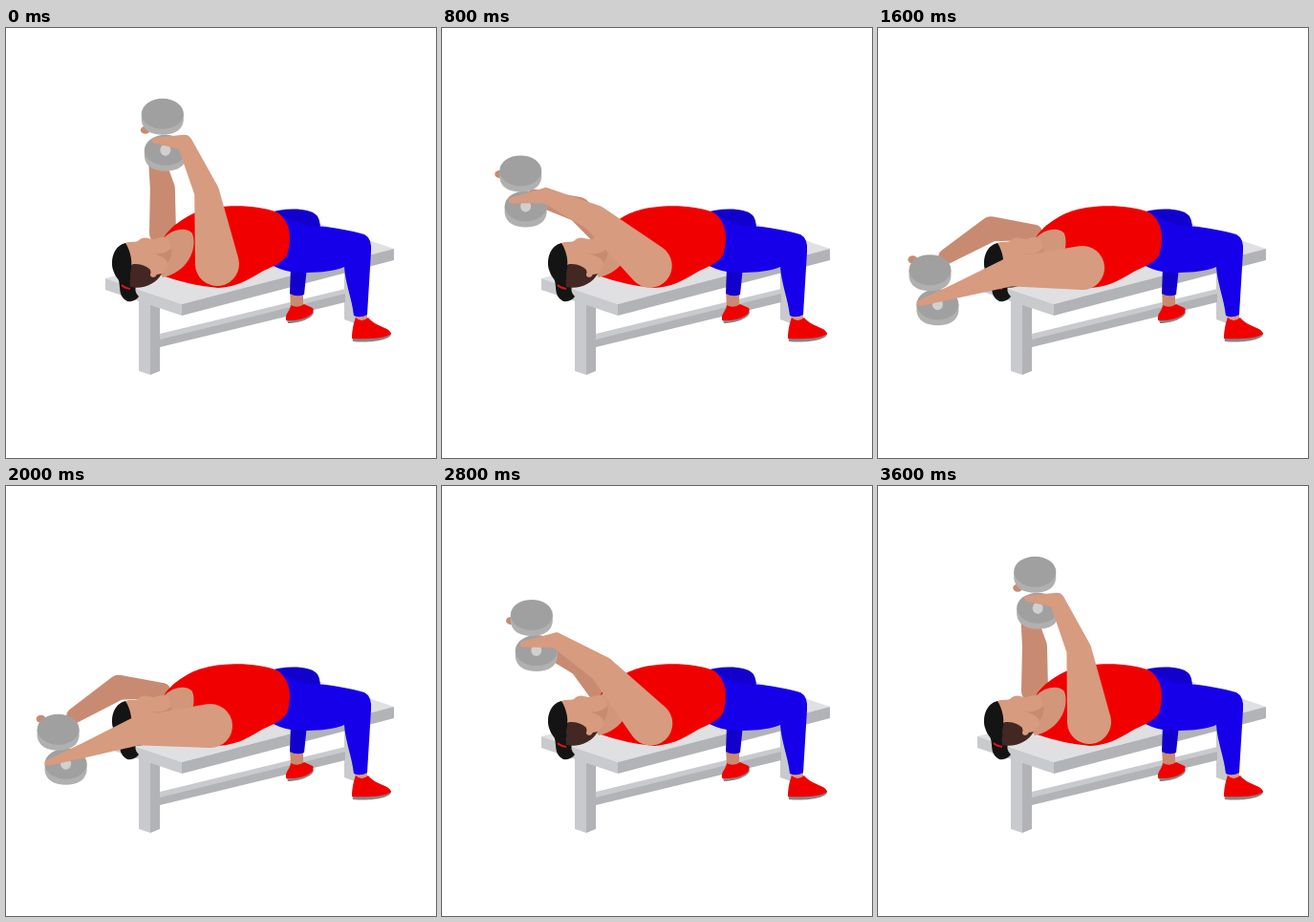
An HTML page that plays this animation: 450 px wide and 450 px high, repeating every 3.7 s.

```html
<!DOCTYPE html>
<html lang="en">
<head>
<meta charset="utf-8">
<title>Dumbbell pullover</title>
<style>
  html, body { margin: 0; width: 100%; height: 100%; overflow: hidden; background: #fff; }
  svg { display: block; width: 100%; height: 100%; }
  .skin { fill: #d79b7f; }
  .shade { fill: #c88b72; }
  .red { fill: #f10000; }
  .blue { fill: #1600ea; }
  .navy { fill: #1200cc; }
  .hair { fill: #141414; }
  .sole { fill: #858585; }
  .top { fill: #e0e0e2; }
  .side { fill: #c9cacd; }
  .front { fill: #b2b3b7; }
</style>
</head>
<body>
<svg viewBox="0 0 450 450">
  <defs>
    <g id="disc">
      <path fill="#b0b0b0" d="M-22 -3V4C-21 14 -12 19 0 19S21 14 22 4V-3Z"/>
      <ellipse cy="-3" rx="22" ry="16" fill="#a0a0a0"/>
    </g>
  </defs>

  <g id="bench">
    <path class="side" d="M354 245H365V309L354 305Z"/>
    <path class="front" d="M365 245H377V303L365 309Z"/>
    <path class="side" d="M161 320L355 273V279L161 327Z"/>
    <path class="front" d="M161 326L355 278V287L161 334Z"/>
    <path class="side" d="M139 280L151 285V363L139 359Z"/>
    <path class="front" d="M151 285L161 288V359L151 363Z"/>
    <path class="top" d="M104 262L326 204L406 231L184 289Z"/>
    <path class="side" d="M104 262L184 289V301L104 274Z"/>
    <path class="front" d="M184 289L406 231V243L184 301Z"/>
  </g>

  <g id="legs">
    <path class="shade" d="M297 275H311L311 292H298Z"/>
    <path class="sole" d="M293 302L322 297C322 304 306 309 295 309Z"/>
    <path class="red" d="M293 306C292 298 297 297 298 290Q305 294 312 289L321 293C325 300 310 307 293 306Z"/>
    <path class="navy" d="M298 250L297 278Q304 282 312 279L315 250Z"/>
    <path class="navy" d="M272 194C290 188 318 187 326 197Q331 206 327 214L280 225Z"/>
    <path class="skin" d="M365 296H378V309L368 311Z"/>
    <path class="sole" d="M362 322L403 319C405 326 383 330 363 328Z"/>
    <path class="red" d="M362 325C362 316 364 308 366 303Q372 309 379 303C387 313 402 313 403 320C398 325 376 326 362 325Z"/>
    <path class="blue" d="M280 194C291 193 299 206 321 207C342 208 361 212 375 216Q383 220 382 234L378 300Q371 304 364 301C362 283 355 267 354 250C340 256 315 257 298 255Q286 253 274 246Z"/>
  </g>

  <path id="far" class="shade"/>

  <path class="red" d="M166 218C172 208 190 195 205 191C228 184 264 185 284 193C299 203 299 222 294 238C288 247 277 250 266 256C250 266 238 271 222 272Q195 270 163 259Z"/>
  <path fill="#d2967b" d="M166 219C175 210 189 208 195 215C201 232 189 256 164 261L150 240Z"/>

  <g id="head">
    <path class="hair" d="M117 262C121 270 116 280 127 286Q135 287 139 281Q133 276 137 266Z"/>
    <path fill="none" stroke="#d8161c" stroke-width="2" d="M121 269Q124 272 130 273"/>
    <path class="skin" d="M122 227C128 222 134 225 138 223C145 216 150 222 156 221Q165 217 170 221C176 233 172 250 162 258L140 265Z"/>
    <path class="shade" d="M153 236Q166 238 173 230Q175 238 169 247Q169 240 153 236Z"/>
    <path fill="#422722" d="M128 249C136 244 148 249 151 253Q151 260 163 257C157 268 143 274 130 271Z"/>
    <path class="hair" d="M125 225C113 228 109 242 112 253Q116 267 129 268Q131 262 130 256C133 247 131 234 125 225Z"/>
    <path class="skin" d="M150 250Q157 246 158 253Q159 260 154 261Q149 260 152 255Z"/>
  </g>

  <ellipse id="finger" class="shade" rx="5" ry="4"/>
  <g id="low">
    <use href="#disc"/>
    <ellipse cy="-3" rx="5.5" ry="6" fill="#d0d0d0"/>
  </g>
  <path id="near" class="skin"/>
  <use id="high" href="#disc"/>
</svg>

<script>
const { sin, cos, PI, hypot, atan2, acos } = Math;
const LOOP = 3700, STEP = 100;
const el = id => document.getElementById(id);
const rad = deg => deg * PI / 180;

const ease = (t, from, to) => {
  const x = Math.min(1, Math.max(0, (t - from) / (to - from)));
  return (1 - cos(PI * x)) / 2;
};

// joints are [x, y, radius]; angles turn from upright towards the head
const reach = ([x, y], length, deg, r) =>
  [x - length * sin(rad(deg)), y - length * cos(rad(deg)), r];

// two circles wrapped by their outer tangents
function taper([ax, ay, ar], [bx, by, br]) {
  const dir = atan2(by - ay, bx - ax);
  const lean = acos((ar - br) / hypot(bx - ax, by - ay));
  const on = (x, y, r, a) => `${x + r * cos(a)} ${y + r * sin(a)}`;
  return `M${on(ax, ay, ar, dir - lean)}L${on(bx, by, br, dir - lean)}`
    + `A${br} ${br} 0 ${br > ar ? 1 : 0} 1 ${on(bx, by, br, dir + lean)}`
    + `L${on(ax, ay, ar, dir + lean)}`
    + `A${ar} ${ar} 0 ${ar > br ? 1 : 0} 1 ${on(ax, ay, ar, dir - lean)}Z`;
}

const limb = (id, ...joints) =>
  el(id).setAttribute("d", joints.slice(1).map((j, i) => taper(joints[i], j)).join(""));

const move = (id, [x, y]) => el(id).setAttribute("transform", `translate(${x} ${y})`);

function draw(time) {
  const t = Math.floor(time % LOOP / STEP) * STEP;
  const f = ease(t, -50, 1700) - ease(t, 1980, 3420);
  const angle = 8 + 86 * f;

  const shoulder = [221 - 7 * f, 247 + 4 * f, 23];
  const elbow = reach(shoulder, 76, angle, 13 + 2 * f);
  const wrist = reach(elbow, 57, angle + 16, 8);
  const low = [wrist[0] - 20 - 2 * f, wrist[1] + 11 + 7 * f];
  const high = [low[0] - 3 - 5 * f, low[1] - 38 + 2 * f];
  const tip = [low[0] - 11 - 8 * f, low[1] - 13 + 9 * f, 3];
  limb("near", shoulder, elbow, wrist, tip);

  const farShoulder = [164, 214, 14 - 6 * f];
  const farElbow = reach(farShoulder, 46 - 14 * sin(PI * f), angle - 8, 13);
  const farHand = [high[0] - 7 + 26 * sin(2 * f), high[1] + 42 * cos(2 * f), 8];
  limb("far", farShoulder, farElbow, farHand);

  move("low", low);
  move("high", high);
  move("finger", [high[0] - 18 - 4 * sin(PI * f), high[1] + 14 - 28 * f]);
}

const start = performance.now();
function tick() {
  draw(performance.now() - start);
  requestAnimationFrame(tick);
}
tick();
</script>
</body>
</html>
```
